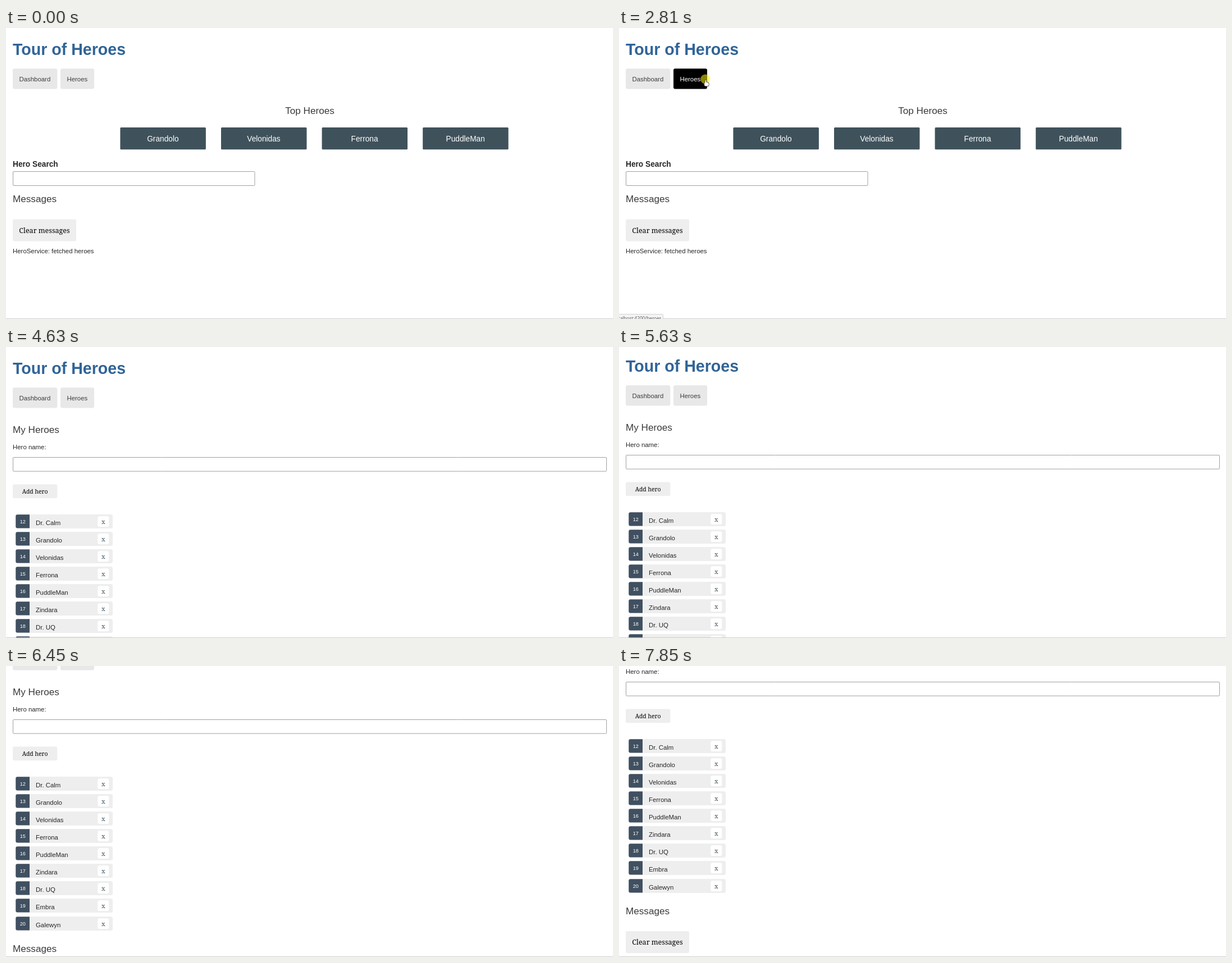
These frames come from a looping animation (1081 px wide and 518 px high, 8 s). An HTML page with a canvas:

```html
<!DOCTYPE html>
<html lang="en">
<head>
<meta charset="utf-8">
<title>Tour of Heroes</title>
<style>
html, body { margin: 0; width: 100%; height: 100%; overflow: hidden; background: #fff; }
canvas { display: block; width: 1081px; height: 518px; }
</style>
</head>
<body>
<canvas id="stage" width="1081" height="518"></canvas>
<script>
const W = 1081, H = 518, LOOP = 8000;
const ctx = document.getElementById('stage').getContext('2d');

// The page is shown at 5/7 zoom: one em of body text and its multiples.
const EM = 16 * 5 / 7;
const H1 = EM * 2.5, H2 = EM * 1.5, LARGE = EM * 1.2, SMALL = EM * 0.8;
const SANS = '"Liberation Sans", Arial, sans-serif';
const SERIF = '"Noto Serif", Cambria, serif';
const INK = '#262626', HEADING = '#3a3a3a', BORDER = '#a0a0a0';
const BUTTON = '#eee', SLATE = '#3f525c', BADGE = '#405061';
const HEROES = ['Dr. Calm', 'Grandolo', 'Velonidas', 'Ferrona', 'PuddleMan', 'Zindara', 'Dr. UQ', 'Embra', 'Galewyn'];

const OPEN_PAGE = 3010, LOADED = 3430, SCROLL_START = 5630, STEP = 200;
const NAV = {
  idle: { fill: '#e8e8e8', ink: '#3d3d3d' },
  hover: { fill: '#42545c', ink: '#fff' },
  active: { fill: '#000', ink: '#fff' },
};
const POINTER = [
  { from: 590, x: 617, y: 453 },
  { from: 790, x: 482, y: 399 },
  { from: 1190, x: 340, y: 79 },
  { from: 1410, x: 304, y: 66 },
  { from: 1610, x: 151, y: 92, hand: true },
  { from: 4230, x: 665, y: 122 },
  { from: 4430, x: 822, y: 161 },
  { from: 4630, hidden: true },
];

const within = (t, from, to) => t >= from && t < to;
const clamp01 = v => Math.min(1, Math.max(0, v));
const smooth = u => u * u * (3 - 2 * u);
const settle = u => 1 - (1 - u ** 1.4) ** 4;

function scrollTop(t) {
  if (t < SCROLL_START) return 0;
  const step = Math.floor((t - SCROLL_START) / STEP);
  const first = smooth(clamp01(0.12 + 0.22 * step));
  const second = settle(clamp01((step - 5) / 6));
  return Math.round(101 * first + 67 * second);
}

function navState(t) {
  if (within(t, 2810, OPEN_PAGE)) return 'active';
  return within(t, 1610, 4230) ? 'hover' : 'idle';
}

function box(x, y, w, h, r, fill, stroke) {
  ctx.beginPath();
  ctx.roundRect(x, y, w, h, r);
  ctx.fillStyle = fill;
  ctx.fill();
  if (!stroke) return;
  ctx.strokeStyle = stroke;
  ctx.lineWidth = 1;
  ctx.stroke();
}

function text(str, x, y, size, color = INK, { align = 'left', weight = 400, family = SANS } = {}) {
  ctx.font = `${weight} ${size}px ${family}`;
  ctx.textAlign = align;
  ctx.fillStyle = color;
  ctx.fillText(str, x, Math.round(y));
}

function navButton(label, x, w, { fill, ink }) {
  box(x, 72.3, w, 36.3, 3, fill);
  text(label, x + EM, 95, EM, ink);
}

function serifButton(label, y, w, h, size) {
  box(12, y, w, h, 3, BUTTON);
  text(label, 12 + w / 2, y + h / 2 + size * 0.38, size, '#000', { align: 'center', family: SERIF });
}

function header(nav) {
  text('Tour of Heroes', 12, 48, H1, '#306498', { weight: 700 });
  navButton('Dashboard', 12, 79.3, NAV.idle);
  navButton('Heroes', 97, 60, NAV[nav]);
}

function dashboard(inputHover) {
  text('Top Heroes', 541, 153, H2, HEADING, { align: 'center' });
  HEROES.slice(1, 5).forEach((name, i) => {
    const x = 203.4 + i * 179.6;
    box(x, 177, 152.5, 39.2, 1.5, SLATE);
    text(name, x + 76, 202, LARGE, '#fff', { align: 'center' });
  });
  text('Hero Search', 12, 247, LARGE, INK, { weight: 700 });
  box(12.5, 255.5, 430.5, 25, 1.5, '#fff', inputHover ? '#4f4f4f' : BORDER);
}

function heroRow(name, i) {
  const y = Math.round(298 + i * 31.07);
  box(17.3, y, 172.7, 25, 3, BUTTON);
  box(17.3, y + 0.3, 24.7, 24.2, [3, 0, 0, 3], BADGE);
  text(12 + i, 29.7, y + 16, SMALL, '#fff', { align: 'center' });
  text(name, 53, y + 19, EM);
  box(163.3, y + 3.2, 20, 18.8, 3, '#fff');
  text('x', 173.2, y + 17, EM, SLATE, { align: 'center', family: SERIF });
}

function heroPage(loaded) {
  text('My Heroes', 12, 153, H2, HEADING);
  text('Hero name:', 12, 182, EM);
  box(12.5, 196.5, 1057, 24.7, 1.5, '#fff', BORDER);
  serifButton('Add hero', 244.5, 79.3, 24.7, 10.4);
  if (loaded) HEROES.forEach(heroRow);
}

function messages(top) {
  text('Messages', 12, top, H2, HEADING);
  serifButton('Clear messages', top + 30, 113, 39, 12.5);
  text('HeroService: fetched heroes', 12, top + 91, EM);
}

function statusBar(t) {
  if (!within(t, 1810, 4630)) return;
  ctx.globalAlpha = t < 4430 ? 1 : 0.5;
  box(-3, 509.5, 81.5, 14, 2, '#f4f4f4', '#d0d0d0');
  if (!within(t, OPEN_PAGE, 3230)) {
    text('localhost:4200/heroes', 75.5, 520, 8.2, '#555', { align: 'right', family: '"Open Sans", sans-serif' });
  }
  ctx.globalAlpha = 1;
}

function arrow() {
  ctx.beginPath();
  ctx.moveTo(0.5, 0.6);
  ctx.lineTo(0.5, 9.8);
  ctx.lineTo(2.6, 7.9);
  ctx.lineTo(4.4, 11.2);
  ctx.lineTo(4.2, 7.3);
  ctx.lineTo(6.5, 7);
  ctx.closePath();
}

function hand() {
  ctx.beginPath();
  ctx.roundRect(2.4, 0.5, 2.2, 8, 1.1);
  ctx.roundRect(1, 4.8, 7.8, 6.6, 2.2);
}

// Outline first, fill on top, so that joined parts show no inner lines.
function pointer(t) {
  const spot = POINTER.findLast(p => t >= p.from);
  if (!spot || spot.hidden) return;
  ctx.save();
  ctx.translate(spot.x, spot.y);
  if (navState(t) === 'active') {
    ctx.beginPath();
    ctx.arc(2.7, -1, 8.6, 0, Math.PI * 2);
    ctx.fillStyle = 'rgba(255, 240, 0, .55)';
    ctx.fill();
  }
  (spot.hand ? hand : arrow)();
  ctx.strokeStyle = '#000';
  ctx.lineWidth = 1.2;
  ctx.stroke();
  ctx.fillStyle = '#fff';
  ctx.fill();
  ctx.restore();
}

function draw(t) {
  const loaded = t >= LOADED;
  ctx.fillStyle = '#fff';
  ctx.fillRect(0, 0, W, H);

  ctx.save();
  ctx.translate(0, -scrollTop(t));
  header(navState(t));
  if (t < OPEN_PAGE) {
    dashboard(within(t, 1190, 1410));
    messages(310.4);
  } else {
    heroPage(loaded);
    messages(loaded ? 610 : 330);
  }
  ctx.restore();

  ctx.fillStyle = '#cdcdcd';
  ctx.fillRect(0, H - 1, W, 1);
  statusBar(t);
  pointer(t);
}

const start = performance.now();
function tick() {
  draw((performance.now() - start) % LOOP);
  requestAnimationFrame(tick);
}
tick();
</script>
</body>
</html>
```
